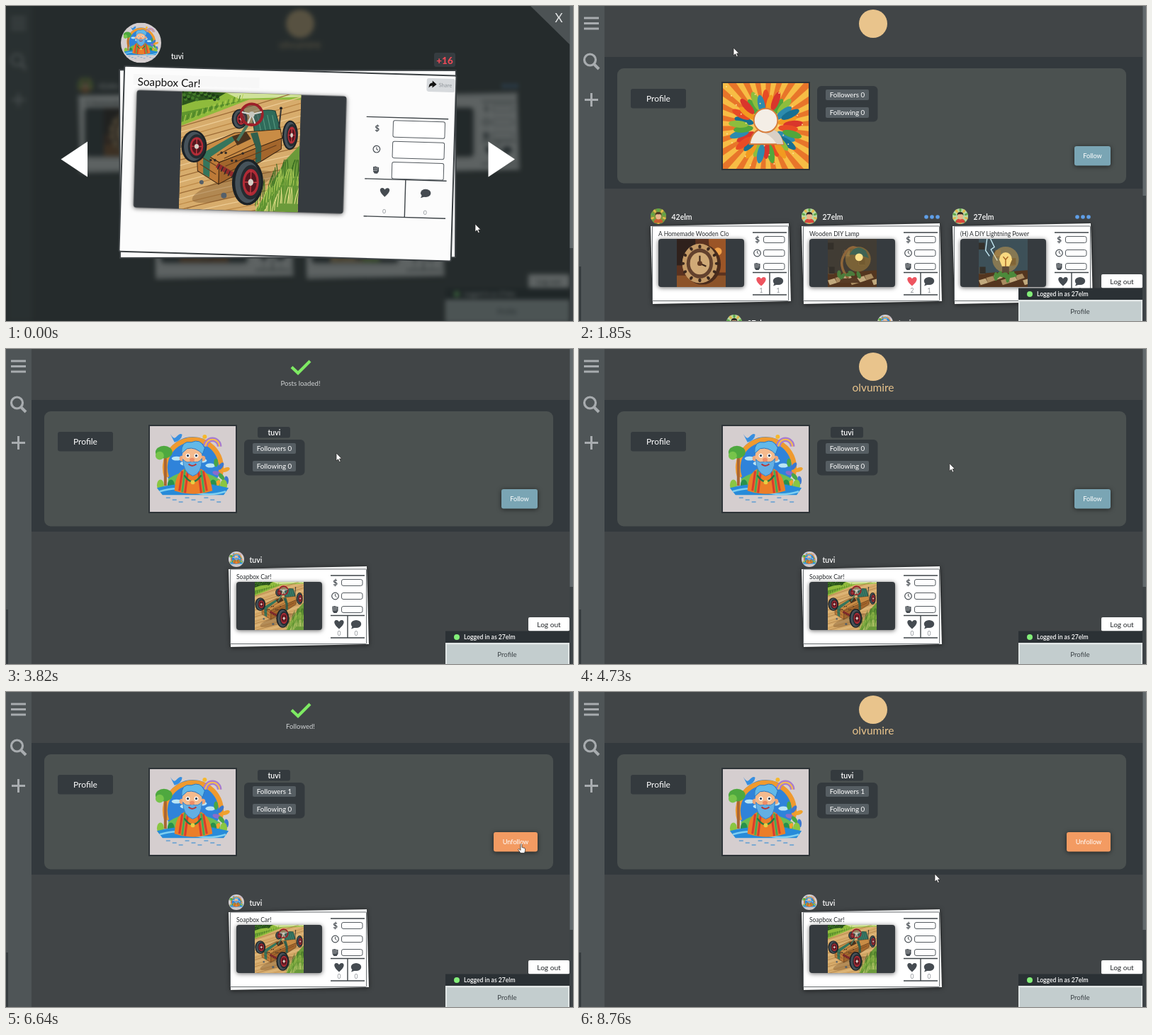
Recreate the animation shown at these times as an HTML page. Size 800x445 px, loop 8.79 s.

```html
<!DOCTYPE html>
<html lang="en">
<head>
<meta charset="utf-8">
<title>Profile follow demo</title>
<style>
  html, body { margin: 0; height: 100%; overflow: hidden; background: #414547; }
  svg { display: block; }
  #stage { width: 100vw; height: 100vh; font-family: Lato, "Open Sans", sans-serif; }
  .dim { filter: blur(3px); }
  .shadow { filter: drop-shadow(0 1px 3px #0009); }
</style>
</head>
<body>
<svg id="stage" viewBox="0 0 800 445"></svg>
<script>
const LOOP = 8790, DARK = '#343a3e', GOLD = '#e9c48c';
const USER = 'tuvi', ME = '27elm', OTHER = '42elm', SITE = 'olvumire';

// Drawing helpers
const rect = (x, y, w, h, fill, r = 0, more = '') =>
  `<rect x="${x}" y="${y}" width="${w}" height="${h}" fill="${fill}" rx="${r}" ${more}/>`;
const disc = (x, y, r, fill, more = '') => `<circle cx="${x}" cy="${y}" r="${r}" fill="${fill}" ${more}/>`;
const oval = (x, y, rx, ry, fill, more = '') =>
  `<ellipse cx="${x}" cy="${y}" rx="${rx}" ry="${ry}" fill="${fill}" ${more}/>`;
const path = (d, fill, more = '') => `<path d="${d}" fill="${fill}" ${more}/>`;
const line = (d, color, w, more = '') => path(d, 'none', `stroke="${color}" stroke-width="${w}" ${more}`);
const text = (x, y, size, str, fill, more = '') =>
  `<text x="${x}" y="${y}" font-size="${size}" fill="${fill}" ${more}>${str}</text>`;
const mid = 'text-anchor="middle"';
const group = (id, body, more = '') => `<g id="${id}" ${more}>${body}</g>`;
const at = (x, y, body, more = '') => `<g transform="translate(${x} ${y}) ${more}">${body}</g>`;
const picture = (id, x, y, w, h = w) => `<use href="#${id}" x="${x}" y="${y}" width="${w}" height="${h}"/>`;
const avatar = (id, x, y, r) =>
  at(x, y, `<g clip-path="url(#round)">${picture(id, -50, -50, 100)}</g>`, `scale(${r / 50})`);
const symbol = (id, size, body) =>
  `<symbol id="${id}" viewBox="0 0 ${size} ${size}" preserveAspectRatio="none">${body}</symbol>`;
const repeat = (n, f) => Array.from({ length: n }, (_, i) => f(i)).join('');

// Illustrations
function wheel(x, y, rx, ry) {
  const hub = x + rx * .2;
  return oval(x, y, rx, ry, '#1b2125') + oval(x, y, rx * .8, ry * .9, '#46525a') +
    oval(hub, y, rx * .68, ry * .75, '#252c31') +
    oval(hub, y, rx * .52, ry * .58, '#b02a35') + oval(hub, y, rx * .38, ry * .44, '#54171f') +
    line(`M${hub - rx * .4} ${y}H${hub + rx * .4}M${hub} ${y - ry * .5}V${y + ry * .5}`, '#c33a42', 1.4) +
    oval(hub, y, rx * .17, ry * .15, '#d6d0c6');
}

const car =
  rect(0, 0, 168, 168, '#d7ac6c') +
  path('M0 0H168V7L95 9 0 49Z', '#8fbb3c') + path('M62 0H168V3L80 8Z', '#cfe29a') +
  path('M0 0H62L48 9 20 13 0 20Z', '#2c561d') +
  repeat(26, i => disc(i * 23 % 52, i * 5 % 12, 2.4, i % 2 ? '#427a29' : '#1d3d16')) +
  path('M0 30L92 9 50 22 0 44Z', '#5f962e') +
  repeat(22, i => line(`M${i * 4} ${44 - i * 1.6}l2 -9`, i % 2 ? '#b9d256' : '#477b24', 1)) +
  repeat(24, i => line(`M0 ${50 + i * 8}Q70 ${28 + i * 8} 168 ${-6 + i * 9}`, ['#9b6a35', '#eccb94', '#bd8947'][i % 3], 1.3)) +
  path('M168 72L150 92 128 130 108 168H168Z', '#6b9a3a') +
  repeat(80, i => {
    const x = 108 + i * 37 % 62, y = Math.max(105, 284 - x * 1.25) + i * 13 % 52;
    return line(`M${x} ${y + 12}q${i % 3} -14 ${i % 9 - 2} -24`, ['#35691f', '#b9d45c', '#588f2c', '#e0dd86'][i % 4], 1.1);
  }) +
  oval(75, 134, 60, 14, '#6b4523', 'opacity=".35" transform="rotate(-20 75 134)"') +
  wheel(82, 37, 11, 14) + wheel(154, 58, 11, 21) +
  path('M100 33Q112 20 132 24L140 50 118 64 104 58Z', '#2f6b5a', 'stroke="#193c34"') +
  repeat(4, i => line(`M${107 + i * 7} 30l6 25`, '#5b9b83', 1)) +
  line('M138 48L140 22', '#333', 2) + disc(140, 20, 2, '#222') +
  path('M23 82L76 57 140 50 143 63 112 77 55 100Z', '#c98c45', 'stroke="#3f2814"') +
  path('M55 100L142 63V78L112 98 55 131Z', '#a3662c', 'stroke="#3a2412"') +
  path('M23 82L55 100V131L25 113Z', '#bd7a38', 'stroke="#3a2412"') +
  path('M32 87L72 62 80 65 42 93V122L33 117Z', '#35755c') +
  path('M98 57L108 55 114 76V96L106 100V78Z', '#315f4d') +
  line('M28 92L51 105M28 103L51 117M64 105L135 73M62 117L108 92M52 90L92 66M62 94L105 72', '#633c1c', 1.2) +
  repeat(10, i => disc(28 + i * 15 % 84, 86 + i * 11 % 22, 1.8, '#332b27')) +
  path('M72 62L92 55 99 65 80 75Z', '#4a331f') +
  line('M94 44L80 68', '#49775f', 4) +
  oval(99, 30, 15, 15, '#4c5454', 'fill-opacity=".45" stroke="#9c2029" stroke-width="4"') +
  line('M85 27L99 30 113 26M99 30L94 43M99 30L104 43', '#d8d8d2', 2.2) + disc(99, 30, 4, '#c8c8c0') +
  line('M52 104L88 124', '#922b2b', 7) +
  repeat(6, i => line(`M${56 + i * 5} ${103 + i * 3}l-3 7`, '#32292a', 1.5)) +
  wheel(19, 78, 18, 23) + wheel(96, 127, 22, 33) +
  disc(63, 147, 4, '#55606a') + disc(31, 129, 3, '#55606a');

const man =
  rect(0, 0, 122, 122, '#d5cecf') +
  disc(61, 55, 40, '#2f83da') + line('M24 73A40 40 0 1 1 100 70', '#ef9a2f', 7) +
  disc(78, 15, 3, '#f6b82d') +
  path('M26 75Q60 52 100 76V91H26Z', '#68bd54') +
  repeat(5, i => oval(38 + i * 12, 46 + i * 7 % 18, 7, 3, '#b9e5f5')) +
  line('M22 45V85', '#a96533', 4) + oval(20, 37, 12, 9, '#4ea83f') + disc(14, 42, 6, '#77c44b') +
  line('M77 29A12 12 0 0 1 101 29M81 29A8 8 0 0 1 97 29', '#a77ad1', 2.5) + line('M79 29A10 10 0 0 1 99 29', '#f3bb50', 2) +
  path('M29 11Q34 19 37 16 43 9 46 12 45 20 35 23Z', '#378fe0') +
  repeat(8, i => oval(94 + i * 7 % 20, 52 + i * 5, 3, 6, ['#48a646', '#3c78cf', '#f0a22d', '#8b6cc9'][i % 4], `transform="rotate(${i * 35} ${94 + i * 7 % 20} ${52 + i * 5})"`)) +
  repeat(7, i => oval(15 + i * 15, 84, 5, 8, i % 2 ? '#28914c' : '#8ac642')) +
  path('M10 88Q60 75 112 88L105 98H18Z', '#278bd9') + line('M14 93Q40 85 61 93T108 93', '#7fcff0', 2.5) +
  path('M35 92Q36 67 49 61H73Q86 68 89 92Q61 101 35 92Z', '#ec7e28') +
  line('M46 64L42 92M54 64L50 95M76 64L81 92M69 64L73 95', '#d93c2e', 3) + line('M50 62L46 94M73 63L77 94', '#48a956', 3) +
  disc(46, 46, 4, '#eca579') + disc(75, 46, 4, '#eca579') + oval(60, 43, 14, 17, '#f4ba8d') +
  path('M45 39Q44 20 59 23 72 17 78 31L75 40Q65 29 53 32Z', '#62b9e9', 'stroke="#2b76bf"') +
  path('M47 47Q52 54 60 50 69 54 74 46 74 68 61 71 47 66 47 47Z', '#63afe3', 'stroke="#3680c7"') +
  disc(54, 42, 3, '#fff') + disc(66, 42, 3, '#fff') + disc(54, 42, 1.6, '#283a52') + disc(66, 42, 1.6, '#283a52') +
  oval(60, 48, 3.5, 3, '#ec8b67') + line('M55 54Q60 59 66 54', '#b4383a', 2) +
  line('M49 70Q61 88 73 70', '#227b45', 2.5) + disc(61, 80, 3, '#e7cf42') +
  repeat(9, i => line(`M${23 + i * 9} ${102 + i % 3 * 3}h6`, '#78a8d2', 2));

const ray = (i, n) => {
  const p = k => `${61 + 95 * Math.cos(k * 2 * Math.PI / n)} ${61 + 95 * Math.sin(k * 2 * Math.PI / n)}`;
  return path(`M61 61L${p(i)} ${p(i + .5)}Z`, '#f7bd45');
};
const leaves = ['#e84b25', '#2d8bad', '#f29a20', '#51a63b', '#176f91', '#d9362c', '#8dbd3d'];
const sunburst =
  rect(0, 0, 122, 122, '#e8752a') + repeat(26, i => ray(i, 26)) + disc(61, 61, 37, '#f9c65c') +
  repeat(34, i => oval(61, 23 + i % 2 * 7, 5, 14, leaves[i * 3 % 7], `transform="rotate(${i * 360 / 17 + i % 2 * 10} 61 62)"`)) +
  repeat(24, i => disc(5 + i * 47 % 114, 5 + i * 71 % 114, 1, '#ffe094')) +
  path('M38 87Q40 70 54 65H68Q83 72 86 87Z', '#f2eadf', 'stroke="#d47535" stroke-width="2"') +
  path('M50 68Q67 71 77 87H86Q83 68 68 65Z', '#d9d0c5') +
  disc(61, 53, 17, '#f4eee6', 'stroke="#d87d3b" stroke-width="2"');

const clock =
  rect(0, 0, 100, 100, '#5b321f') + rect(0, 0, 38, 55, '#2f211c') + path('M65 0H100V70H70Z', '#9b5527') +
  path('M0 76H100V100H0Z', '#8c5329') + disc(84, 26, 8, '#f0a24a') +
  oval(52, 53, 38, 42, '#4b2c1c') + oval(47, 51, 36, 41, '#c49a66') + oval(47, 51, 27, 31, '#62412d') +
  oval(47, 51, 20, 23, '#d0aa77') +
  repeat(12, i => oval(47, 16, 3, 4, '#3b281e', `transform="rotate(${i * 30} 47 51)"`)) +
  line('M47 51L47 35M47 51L60 57', '#38231a', 3) + disc(47, 51, 5, '#603b24');

const bench = sky =>
  rect(0, 0, 100, 100, sky) + path('M0 72L100 65V100H0Z', '#54361f') +
  repeat(9, i => rect(i * 31 % 92, 8 + i * 17 % 52, 12, 14, i % 2 ? '#655945' : '#34302a')) +
  repeat(7, i => path(`M${i * 15} ${86 - i % 3 * 5}l14 -4 5 9 -15 5Z`, i % 2 ? '#a98b60' : '#c2aa7e'));
const lamp =
  bench('#413c34') + disc(62, 42, 26, '#e6a83c', 'opacity=".35"') +
  line('M42 82Q20 55 34 32T63 22', '#8e663a', 5) + path('M44 33Q57 8 78 25L84 40Q64 32 44 33Z', '#3f6354') +
  disc(64, 38, 8, '#ffe18a') + path('M27 82H60L67 91H24Z', '#573b25') +
  repeat(5, i => oval(23 + i * 10, 73 + i % 2 * 6, 4, 8, '#4b7c3c', `transform="rotate(${i * 40} ${23 + i * 10} 74)"`));
const storm =
  bench('#3d5058') + line('M24 0L32 17 25 22 38 45M17 0L14 24 22 36', '#c5e9f4', 2) +
  disc(55, 43, 27, '#f3b44c', 'opacity=".4"') + path('M42 43A13 15 0 1 1 68 43L62 58H48Z', '#f9d980') +
  line('M55 58V43L50 37M55 43L60 37', '#a25f20', 2) + rect(48, 57, 14, 13, '#5c4a38') +
  repeat(9, i => oval(35 + i * 5, 78 - i % 3 * 4, 4, 9, '#4c8a3b', `transform="rotate(${i * 37} ${35 + i * 5} 76)"`));

const face = (bg, hair, shirt) =>
  rect(0, 0, 100, 100, bg) + repeat(10, i => oval(50, 8, 7, 14, i % 2 ? '#e2b94c' : '#5ca64a', `transform="rotate(${i * 36} 50 50)"`)) +
  path('M20 92Q22 65 50 65T80 92Z', shirt) + oval(50, 49, 18, 22, '#eab68c') +
  path('M30 47Q28 23 50 23T70 47L64 37H37Z', hair);

// Interface parts
const heart = color => path('M0 6.5C-9-1-7.5-6-3.7-6-1.5-6 0-4 0-3.5 0-4 1.5-6 3.7-6 7.5-6 9-1 0 6.5Z', color);
const bubble = oval(0, -.5, 7.2, 5.6, '#454b51') + path('M-5 2L-7 6.5 0 4Z', '#454b51');
const fist = path('M-4-2V-4.5H-2V-5H0V-4.5H2V-4H4V2L2 5H-2L-4 2Z', '#454b51') +
  line('M-2-4V0M0-4V0M2-4V0M-4 1H2', '#fff', .5);
const watch = disc(0, 0, 4.8, 'none', 'stroke="#454b51" stroke-width="1.2"') + line('M0-3V0L2 1.5', '#454b51', 1);

function stats({ x0, x1, lines: [a, b, c], iconX, rowY, step, box: [bx, bw, bh], heartY, countY, likes, notes, liked }) {
  const half = (x0 + x1) / 2, quarter = (x1 - x0) / 4;
  const icons = [text(0, 4, 11.5, '$', '#454b51', mid + ' font-weight="700"'), watch, fist];
  return line(`M${x0} ${a}H${x1}M${x0} ${b}H${x1}M${x0} ${c}H${x1}M${half} ${b}V${c}`, '#3d4347', 1.4) +
    icons.map((icon, i) => at(iconX, rowY + i * step, icon) +
      rect(bx, rowY + i * step - bh / 2, bw, bh, '#fff', 2.5, 'stroke="#555b60"')).join('') +
    at(half - quarter, heartY, heart(liked ? '#ee5560' : '#454b51')) +
    at(half + quarter, heartY, bubble) +
    text(half - quarter, countY, 8.5, likes, '#8c9196', mid) + text(half + quarter, countY, 8.5, notes, '#8c9196', mid);
}

function card(x, y, { user, face, title, pic, likes = 0, notes = 0, liked = false, mine = false }) {
  return at(x, y,
    avatar(face, 10, -12, 11) + text(28.5, -7.5, 10.5, user, '#fff', 'font-weight="600"') +
    (mine ? [175, 183, 191].map(cx => disc(cx, -11, 2.8, '#5f9fe8')).join('') : '') +
    path('M-1 2L194-2 197 108 2 112Z', '#f4f5f5', 'class="shadow"') +
    rect(1.5, 2, 192, 105.5, '#fff', 1, 'stroke="#4a5053" stroke-width=".8"') +
    `<g clip-path="url(#titleBox)">${text(10, 16, 8.5, title, '#25292c')}</g>` +
    rect(10, 20, 121, 68, '#363b3f', 4, 'class="shadow"') + picture(pic, 36, 20, 69, 68) +
    stats({ x0: 143, x1: 191, lines: [11, 67.5, 99], iconX: 149.5, rowY: 21, step: 19, box: [158.5, 29.5, 9], heartY: 80, countY: 96, likes, notes, liked }));
}

const pill = (x, y, w, id, str) =>
  rect(x, y, w, 15, '#565e63', 2) + text(x + w / 2, y + 11, 9.8, str, '#fff', `${mid} id="${id}"`);
const button = (id, x, w, fill, str) =>
  group(id, rect(x, 198, w, 27.5, fill, 3, 'class="shadow"') + text(x + w / 2, 215, 9.2, str, '#fff', mid));

const band =
  rect(36, 72, 760, 186, '#33393d') + rect(54, 88, 718, 162.5, '#4b5150', 9) +
  rect(73, 117, 78, 27.5, DARK, 3) + text(112, 135.2, 12, 'Profile', '#fff', mid) +
  rect(201, 107, 125, 125, '#2e3438') + group('anyone', picture('sunburst', 203, 109, 121)) + group('person', picture('man', 203, 109, 121)) +
  group('userName', rect(355, 110, 46, 15.5, DARK, 3) + text(378.5, 121.5, 10.6, USER, '#fff', mid + ' font-weight="600"')) +
  group('counts', rect(336, 113, 85.5, 50.5, DARK, 6) + pill(348, 118, 61, 'followers', 'Followers 0') + pill(348, 143, 61, 'following', 'Following 0')) +
  button('follow', 699, 51, '#7aa5b4', 'Follow') +
  rect(698.5, 197.5, 52.5, 28.5, 'none', 4, 'id="glow" stroke="#b9d2da" stroke-width="1.8"') +
  button('unfollow', 688, 62, '#f39b62', 'Unfollow');

const feed = [
  [102, 309, { user: OTHER, face: 'faceA', title: 'A Homemade Wooden Clock', pic: 'clock', likes: 1, notes: 1, liked: true }],
  [315, 309, { user: ME, face: 'faceB', title: 'Wooden DIY Lamp', pic: 'lamp', likes: 2, notes: 1, liked: true, mine: true }],
  [528, 309, { user: ME, face: 'faceB', title: '(H) A DIY Lightning Power', pic: 'storm', mine: true }],
  [209, 459, { user: ME, face: 'faceB', title: 'Wooden Shelf', pic: 'clock' }],
  [422, 459, { user: USER, face: 'man', title: 'Soapbox Car!', pic: 'car' }]
].map(c => card(...c)).join('');

const side =
  rect(0, 0, 36, 445, '#4f5557') + rect(0, 368, 3, 77, '#363c3f') +
  line('M7 17H28M7 24.5H28M7 32H28', '#a8acaf', 2.8) +
  disc(15.5, 76, 8, 'none', 'stroke="#a8acaf" stroke-width="3.2"') + line('M21 82L28 89', '#a8acaf', 4) +
  line('M8 132.5H27M17.5 123V142', '#a8acaf', 3);

const status =
  group('logo', disc(415, 25, 20, GOLD)) + group('site', text(415, 60, 15.5, SITE, GOLD, mid)) +
  group('done', line('M403 25.5L412 34 429 17', '#7eea63', 4.2) + text(415.5, 51.5, 9.6, '', '#d0d3d4', mid + ' id="message"'));

const account =
  rect(737, 379, 58, 19.5, '#fff', 2) + text(766, 392.5, 10.1, 'Log out', '#25292c', mid) +
  rect(620, 398.5, 175, 17, '#2b3135') + disc(636, 407, 4, '#83ee79') + text(646, 410, 8.6, `Logged in as ${ME}`, '#fff', 'font-weight="600"') +
  rect(620, 415, 175, 32, '#e1e6e6') + rect(622, 417.5, 171, 30, '#c3cdce') + text(707, 435, 9.7, 'Profile', '#3b4246', mid);

const modalCard =
  rect(0, 0, 468.5, 262, '#fcfcfc', 2, 'stroke="#3b4043" stroke-width="2"') +
  stats({ x0: 343.5, x1: 459, lines: [61.5, 149, 202], iconX: 359, rowY: 77.5, step: 29.4, box: [381.5, 73, 23.5], heartY: 167.5, countY: 197.5, likes: 0, notes: 0 }) +
  rect(427, 4.5, 40, 19, '#d7dadd', 3) + path('M430 18Q430 11 435 11V8L441 13 435 18V15Q432 15 430 18Z', '#111') +
  text(444, 16.5, 7.6, 'Share', '#8f959a') +
  group('panel', rect(0, 1, 334, 260, '#fcfcfc', 2, 'style="filter:drop-shadow(5px 0 4px #000a)"'), 'clip-path="url(#cardBox)"') +
  rect(13, 11, 178, 15, '#f7f7f7') + text(19, 27, 15.3, 'Soapbox Car!', '#111') +
  rect(18.5, 33.5, 296, 166, '#363b3f', 4, 'class="shadow"') + picture('car', 82.5, 33.5, 168, 166);

const modal =
  rect(0, 0, 800, 445, '#1b2122', 0, 'opacity=".7"') +
  path('M740 0H796V55Z', '#4c5254') + text(780, 23, 17, 'X', '#e2e4e5', mid) +
  avatar('man', 190.5, 52, 28.5) + text(233, 75, 10.4, USER, '#fff', 'font-weight="600"') +
  rect(604, 66, 30, 20, '#363c40', 3) + text(619, 81.5, 13.4, '+16', '#f04a57', mid + ' font-weight="800"') +
  path('M160 90L635 91 634 355 161 356Z', '#fcfcfc', 'stroke="#3b4043" stroke-width="2" stroke-linejoin="round"') +
  at(167.2, 84.7, modalCard, 'rotate(1.7)') +
  path('M77.5 216.5L115 191.5V241.5ZM718 216.5L680.5 191.5V241.5Z', '#fff');

const arrow = path('M0 0V11L2.6 8.7 4.4 12.6 6.2 11.8 4.5 8H7.8Z', '#fff', 'stroke="#222" stroke-width=".7"');
const hand = path('M-1 1Q0-1 1 1V5L5 6Q6 7 5.5 10L4.5 13H-1L-4.5 8Q-4 6-2 8L-1 9Z', '#fff', 'stroke="#222" stroke-width=".7"');

document.getElementById('stage').innerHTML =
  `<defs><clipPath id="round">${disc(0, 0, 50, '#000')}</clipPath>
   <clipPath id="titleBox">${rect(8, 5, 101, 16, '#000')}</clipPath>
   <clipPath id="cardBox">${rect(1, 1, 466.5, 260, '#000')}</clipPath>` +
  symbol('car', 168, car) + symbol('man', 122, man) + symbol('sunburst', 122, sunburst) +
  symbol('clock', 100, clock) + symbol('lamp', 100, lamp) + symbol('storm', 100, storm) +
  symbol('faceA', 100, face('#7d9a3e', '#503523', '#c75d31')) + symbol('faceB', 100, face('#b9d9a0', '#2e2723', '#d8483e')) + '</defs>' +
  group('page', rect(0, 0, 800, 445, '#414547') + group('band', band) + group('feed', feed) +
    group('own', card(315, 309, { user: USER, face: 'man', title: 'Soapbox Car!', pic: 'car' })) + side + status + account) +
  group('modal', modal) +
  rect(795.5, 0, 5, 445, '#3d4346') + rect(795.5, 0, 5, 0, '#636a6d', 0, 'id="thumb"') +
  group('cursor', group('arrow', arrow) + group('hand', hand));

// Timeline
const OPEN = 1650, LOADED = 2500, CLICK = 6150, FOLLOWED = 6450, NOTICE = 2000;
const moves = [
  [0, 662, 308], [120, 662, 308], [930, 294, 123], [1000, 294, 123], [1350, 200, 57], [1650, 200, 57],
  [1850, 218, 59], [2600, 340, 105], [3500, 466, 147], [4400, 466, 147], [5500, 727, 214],
  [6600, 727, 214], [7300, 726, 271], [8060, 726, 271], [8700, 502, 257], [LOOP, 502, 257]
];
const $ = id => document.getElementById(id);
const show = (id, on) => { $(id).style.display = on ? '' : 'none'; };
const clamp = v => Math.max(0, Math.min(1, v));
const ease = v => v * v * (3 - 2 * v);

function pointer(t) {
  const i = moves.findIndex(m => m[0] > t), [t0, x0, y0] = moves[i - 1], [t1, x1, y1] = moves[i];
  const k = ease((t - t0) / (t1 - t0));
  return [x0 + (x1 - x0) * k, y0 + (y1 - y0) * k];
}

function render(t) {
  const open = t < OPEN, loaded = t >= LOADED, followed = t >= FOLLOWED;
  const loading = !open && !loaded || t >= CLICK && !followed;
  const notice = loaded && t < LOADED + NOTICE || followed && t < FOLLOWED + NOTICE;
  const [x, y] = pointer(t);
  const onButton = x > 699 && x < 750 && y > 198 && y < 226;

  $('page').setAttribute('class', open ? 'dim' : '');
  show('modal', open);
  show('band', !open);
  show('feed', !loaded);
  show('own', loaded);
  $('feed').setAttribute('transform', `translate(0 ${open ? -185 : 0})`);
  show('anyone', !loaded);
  show('person', loaded);
  show('userName', loaded);
  $('counts').setAttribute('transform', `translate(0 ${loaded ? 15 : 0})`);
  $('followers').textContent = `Followers ${followed ? 1 : 0}`;
  show('follow', !followed);
  show('unfollow', followed);
  show('glow', onButton && !followed);
  show('logo', !notice);
  show('site', !notice && !loading);
  show('done', notice);
  $('message').textContent = followed ? 'Followed!' : 'Posts loaded!';
  $('panel').style.opacity = clamp((t - 520) / 250) * clamp((1350 - t) / 250);
  $('thumb').setAttribute('height', open ? 342 : loaded ? 336 : 268);

  const pointing = open ? t > 520 : onButton;
  show('hand', pointing);
  show('arrow', !pointing);
  $('cursor').setAttribute('transform', `translate(${x} ${y})`);
}

const start = performance.now();
function tick() {
  render((performance.now() - start) % LOOP);
  requestAnimationFrame(tick);
}
tick();
</script>
</body>
</html>
```
